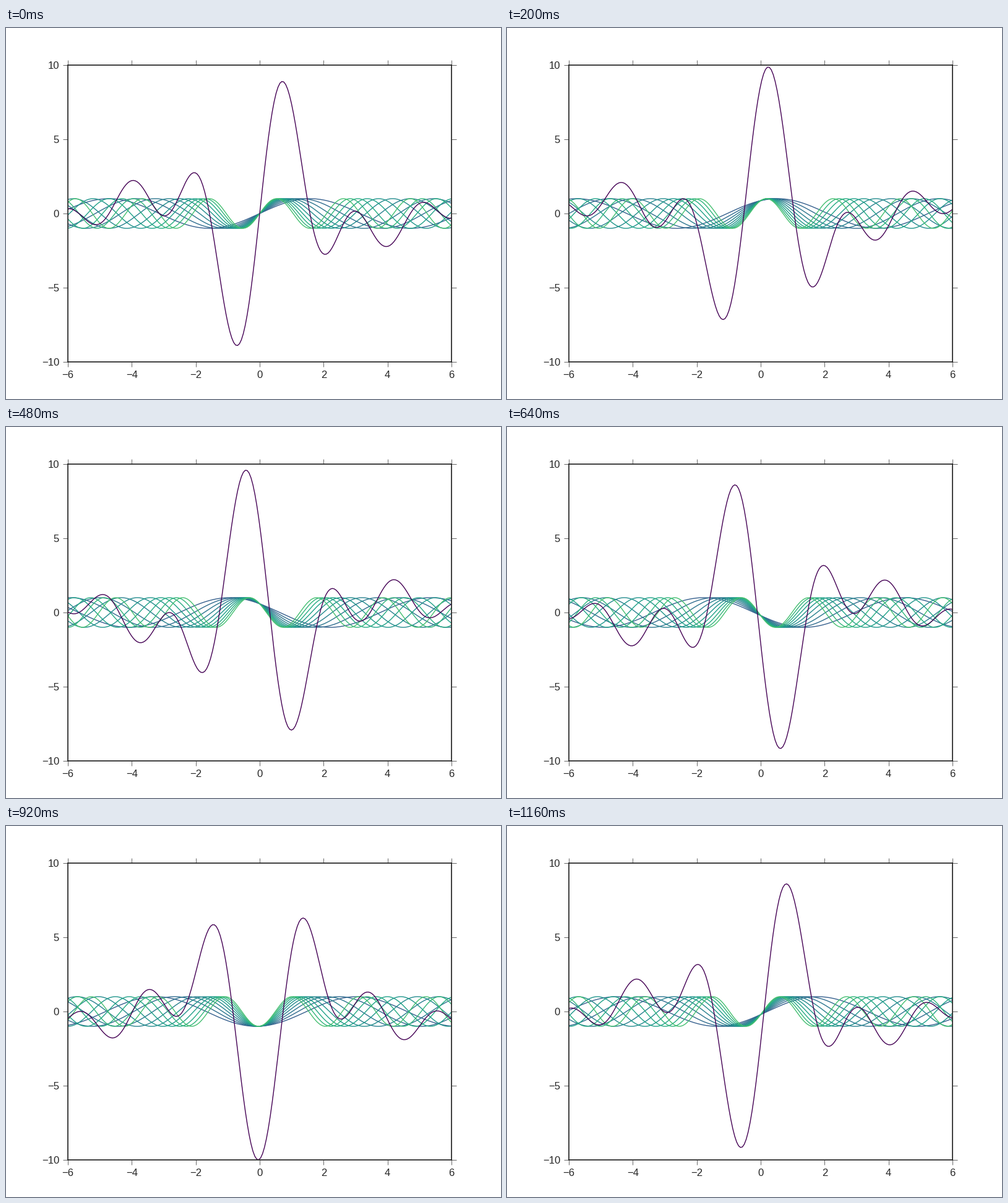
Write a matplotlib script that moves like this. It is 800 by 600 pixels and loops after 1200 ms.

```python
import matplotlib.pyplot as plt
import numpy as np
from matplotlib.animation import FuncAnimation

FRAMES = 30
INTERVAL = 40
WAVES = 10
INK = "0.15"

plt.rcParams.update({
    "font.family": "Liberation Sans",
    "font.size": 12,
    "axes.unicode_minus": True,
})

fig = plt.figure(figsize=(8, 6), dpi=100, facecolor="white")
ax = fig.add_axes([0.125, 0.1, 0.775, 0.8])
ax.set(xlim=(-6, 6), ylim=(-10, 10),
       xticks=range(-6, 7, 2), yticks=range(-10, 11, 5))
ax.tick_params(direction="out", length=6, width=0.5, pad=4, color=INK,
               labelcolor=INK, labelsize=12, top=True, right=True)
for spine in ax.spines.values():
    spine.set(linewidth=1.25, edgecolor=INK)

x = np.linspace(-6, 6, 200)
wavenumbers = np.linspace(1, 3, WAVES)
colors = plt.cm.viridis(np.linspace(0.3, 0.7, WAVES))
wave_lines = [ax.plot([], [], color=c, linewidth=1)[0] for c in colors]
sum_line, = ax.plot([], [], color=plt.cm.viridis(0.0), linewidth=1)


def update(frame):
    phase = 2 * np.pi * frame / FRAMES
    waves = np.sin(np.outer(wavenumbers, x) + phase)
    for line, wave in zip(wave_lines, waves):
        line.set_data(x, wave)
    sum_line.set_data(x, waves.sum(axis=0))
    return [*wave_lines, sum_line]


anim = FuncAnimation(fig, update, frames=FRAMES, interval=INTERVAL,
                     init_func=lambda: update(0), repeat=True, repeat_delay=0)
plt.show()
```
